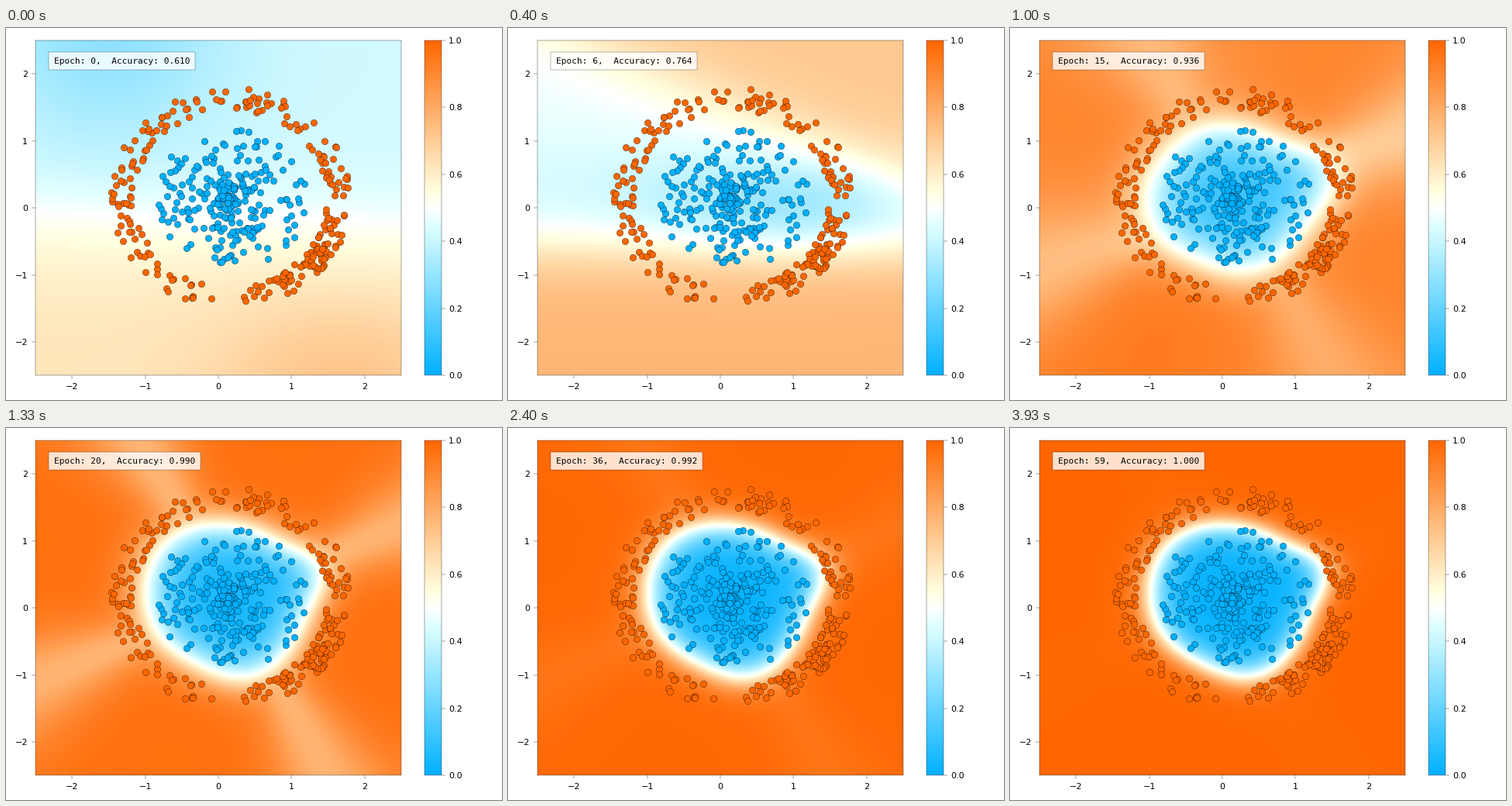
Write a matplotlib script that moves like this. It is 640x480 px and loops after 3990 ms.

```python
import numpy as np
import matplotlib.pyplot as plt
from matplotlib.animation import FuncAnimation
from matplotlib.colors import LinearSegmentedColormap

W, H, DPI = 640, 480, 100
EPOCHS = 60
LOOP_MS = 3990
THIN = 0.25
BLUE, ORANGE = "#00b0ff", "#ff6600"
CMAP = LinearSegmentedColormap.from_list("decision", [
    (0, BLUE), (0.45, "#e0ffff"), (0.5, "white"), (0.55, "#ffffe0"), (1, ORANGE)], N=512)
rng = np.random.default_rng(7)


# ---- samples: a disc that thins outwards, inside a noisy ring ----

def polar(r, degrees):
    a = np.radians(degrees)
    return 0.16 + r * np.cos(a), 0.15 + r * np.sin(a)


def make_core(n=250):
    return polar(1.06 * rng.random(n) ** 1.1, rng.uniform(0, 360, n))


def make_ring(n=205, extra=40):
    spread = rng.uniform(-84, 264, n)
    crowd = rng.normal(-38, 10, extra)
    return polar(rng.uniform(1.32, 1.64, n + extra), np.append(spread, crowd))


# ---- decision surface: logits at a few epochs, blended in between ----

x, y = np.meshgrid(np.linspace(-2.5, 2.5, 236), np.linspace(-2.5, 2.5, 216))
radius = np.hypot(x - 0.2, y - 0.15)
angle = np.degrees(np.arctan2(y - 0.15, x - 0.2))


def sigmoid(z):
    return 1 / (1 + np.exp(-z))


def blob(cx, cy, sx, sy):
    return np.exp(-(x - cx) ** 2 / sx - (y - cy) ** 2 / sy)


def lobe(at, width):
    """Bump around one compass direction."""
    turn = (angle - at + 180) % 360 - 180
    return np.exp(-(turn / width) ** 2)


def basin(depth, edge, cap):
    """Bowl of given depth crossing zero at edge and levelling off at cap."""
    q = depth * ((radius / edge) ** 2 - 1)
    return np.where(q < 0, q, cap * np.tanh(q / cap))


def split():
    """Cool above, warm below."""
    s = y + 0.12 + 0.05 * x
    slope = -np.where(s > 0, 0.32 * np.tanh(1.5 * s), 0.5 * np.tanh(0.96 * s))
    return slope - 0.6 * blob(-1.5, 2.7, 2.5, 3) + 0.45 * blob(1.7, -2.6, 3, 1.5)


def trough():
    """Cool band between a warm floor and a warm upper right."""
    floor = 1.25 * sigmoid(-3.5 * (y + 0.65))
    hill = 1.0 * sigmoid(3 * (0.5 * x + y - 1.6))
    cool = 0.1 + 0.2 * np.exp(-(y - 0.2) ** 2 / 0.8) + 0.6 * blob(0.9, 0, 3, 0.5)
    return floor + hill - cool


def lens():
    """Basin drawn out to the left and right."""
    edge = 0.92 + 0.65 * lobe(12, 28) + 0.42 * lobe(192, 35) + 0.1 * lobe(110, 25)
    cap = (1.4 - lobe(15, 20) - 0.9 * lobe(190, 22) - 0.5 * lobe(100, 30)
           + 0.7 * lobe(240, 30))
    return basin(1.3, edge, cap)


def kite(depth, cap, dip):
    """Basin with rounded corners and a pale ray leaving each of them."""
    edge = (1 + 0.24 * lobe(20, 22) + 0.2 * lobe(140, 45)
            + 0.12 * lobe(205, 40) + 0.18 * lobe(282, 32))
    rays = sum(lobe(at, 18) for at in (25, 119, 205, 296))
    return basin(depth, edge, cap - dip * rays)


KEYS = [0, 6, 11, 20, 36, 59]
LOGITS = [split(), trough(), lens(),
          kite(3, 3.4, 2.2), kite(4, 5, 2), kite(4.5, 6.5, 1.5)]


def surface(epoch):
    i = min(np.searchsorted(KEYS, epoch, side="right"), len(KEYS) - 1)
    t = (epoch - KEYS[i - 1]) / (KEYS[i] - KEYS[i - 1])
    return sigmoid(LOGITS[i - 1] * (1 - t) + LOGITS[i] * t)


def accuracy(epoch):
    a = np.interp(epoch, [0, 6, 11, 20, 36, 48, 59],
                  [0.61, 0.764, 0.892, 0.99, 0.992, 0.998, 1])
    return round(a * 500) / 500


# ---- figure ----

plt.rcParams.update({"font.family": "DejaVu Sans", "font.size": 8,
                     "axes.linewidth": THIN, "xtick.major.width": THIN,
                     "ytick.major.width": THIN})
fig = plt.figure(figsize=(W / DPI, H / DPI), dpi=DPI, facecolor="white")
ax = fig.add_axes([38 / W, 31.7 / H, 472 / W, 432.3 / H])
cax = fig.add_axes([540 / W, 31.7 / H, 21.6 / W, 432.3 / H])

field = ax.imshow(surface(0), cmap=CMAP, vmin=0, vmax=1, origin="lower",
                  extent=(-2.5, 2.5, -2.5, 2.5), aspect="auto",
                  interpolation="bilinear")
bar = fig.colorbar(field, cax=cax, ticks=np.arange(0, 1.1, 0.2))
bar.outline.set_linewidth(THIN)
for points, color in ((make_core(), BLUE), (make_ring(), ORANGE)):
    ax.scatter(*points, s=36, c=color, edgecolors="black", linewidths=THIN, zorder=3)
ax.set(xlim=(-2.5, 2.5), ylim=(-2.5, 2.5), xticks=range(-2, 3), yticks=range(-2, 3))
label = ax.text(-2.25, 2.25, "", va="top", family="DejaVu Sans Mono", zorder=5,
                bbox=dict(boxstyle="square,pad=0.6", facecolor="white",
                          edgecolor="black", alpha=0.8, linewidth=THIN))


def update(epoch):
    field.set_data(surface(epoch))
    label.set_text(f"Epoch: {epoch},  Accuracy: {accuracy(epoch):.3f}")
    return field, label


anim = FuncAnimation(fig, update, frames=EPOCHS, interval=LOOP_MS / EPOCHS,
                     repeat=True, repeat_delay=0)
plt.show()
```
